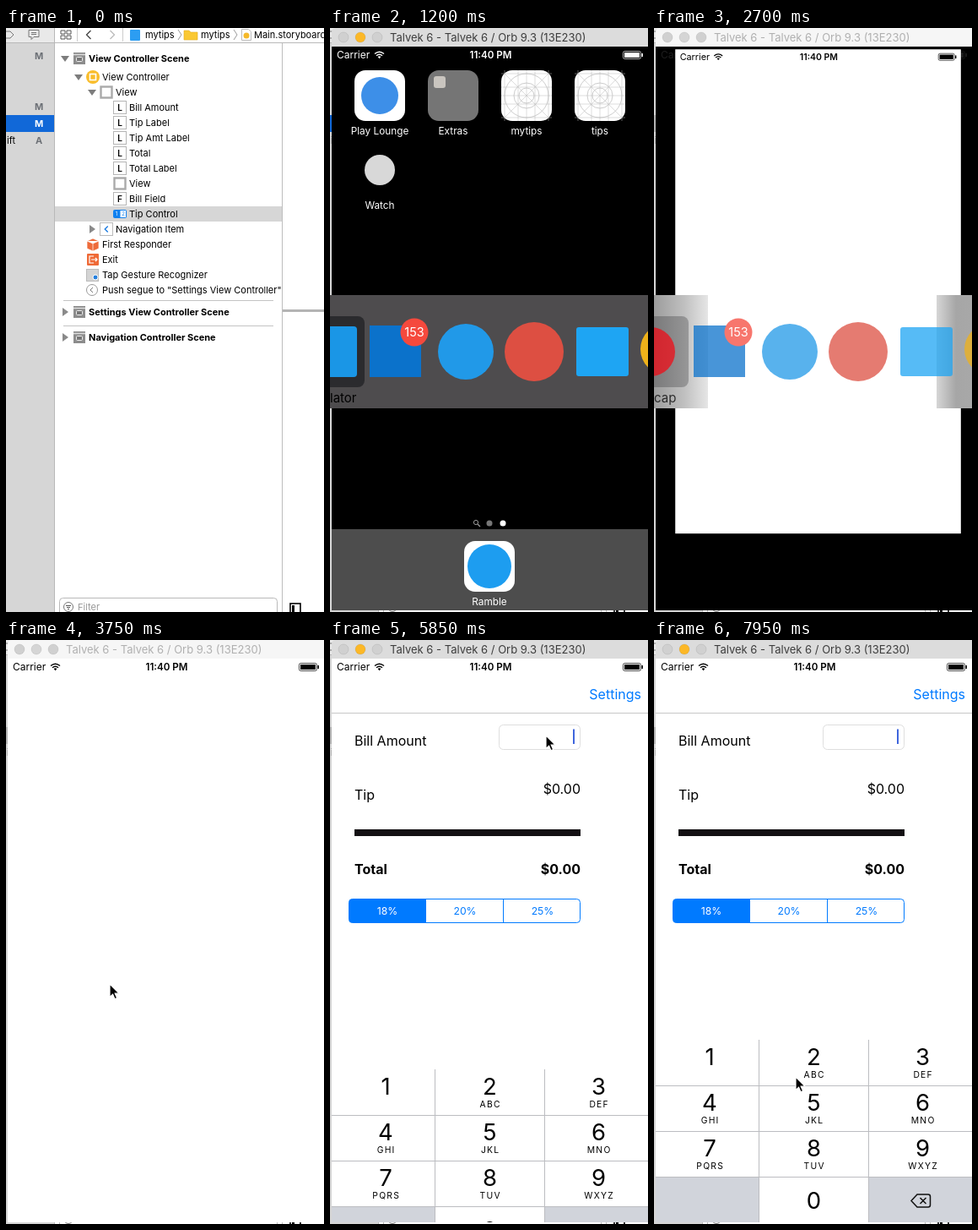
Write an HTML page that moves like this. It is 377 px wide and 691 px high and loops after 8 s.

```html
<!DOCTYPE html>
<html lang="en">
<head>
<meta charset="utf-8">
<title>Tip calculator demo</title>
<style>
html, body { margin: 0; width: 100%; height: 100%; overflow: hidden; background: #fff; }
svg { display: block; width: 377px; height: 691px; font-family: Inter, sans-serif; }
text { white-space: pre; }
</style>
</head>
<body>
<svg id="stage" viewBox="0 0 377 691"></svg>
<script>
const BLUE = '#007aff';
const stage = document.getElementById('stage');

// Markup helpers; text is placed by the vertical centre of its capitals.
const text = (x, y, s, size = 11, attrs = '') =>
  `<text x="${x}" y="${y + size * .364}" font-size="${size}" ${attrs}>${s}</text>`;
const rect = (x, y, w, h, fill, attrs = '') =>
  `<rect x="${x}" y="${y}" width="${w}" height="${h}" fill="${fill}" ${attrs}/>`;
const circle = (x, y, r, fill, attrs = '') =>
  `<circle cx="${x}" cy="${y}" r="${r}" fill="${fill}" ${attrs}/>`;
const path = (d, stroke, width = 1, fill = 'none', attrs = '') =>
  `<path d="${d}" stroke="${stroke}" stroke-width="${width}" fill="${fill}" ${attrs}/>`;
const group = (id, body, attrs = '') => `<g id="${id}" ${attrs}>${body}</g>`;
const middle = 'text-anchor="middle"', end = 'text-anchor="end"', bold = 'font-weight="700"';

// ---- Editor window ----
const arrow = (x, y, open) => open
  ? path(`M${x - 5} ${y - 3}h10l-5 7z`, 'none', 0, '#7d7d7d')
  : path(`M${x - 3} ${y - 5}v10l7 -5z`, 'none', 0, '#8a8a8a');
const chevron = (x, y, h, dir, color, width) =>
  path(`M${x - dir * h / 2} ${y - h}l${dir * h} ${h}l${-dir * h} ${h}`, color, width);
const folder = x => path(`M${x} 3h6l2 2h8v9h-16z`, '#e3ae1c', .6, '#fac832');
const sceneIcon = y => rect(80, y - 7, 14, 14, '#8c8c8c') +
  path(`M80 ${y - 4.5}h14`, '#ddd', 1.5) + rect(83.5, y - 1.5, 7, 5, '#777', 'stroke="#eee" rx="1"');
const viewIcon = (x, y) => rect(x + 1, y - 6.5, 13, 13, '#fff', 'stroke="#aaa" stroke-width="2.4"');
const letterIcon = (y, s) => rect(127.5, y - 7.5, 15, 15, '#fff', 'stroke="#b5b5b5"') +
  text(135, y, s, 10, middle + ' font-weight="600"');

function editor() {
  const outline = ['Bill Amount', 'Tip Label', 'Tip Amt Label', 'Total', 'Total Label', 'View', 'Bill Field', 'Tip Control'];
  const kinds = 'LLLLLVFC';
  let s = rect(0, 0, 377, 691, '#fff') + rect(0, 0, 57, 691, '#d6d6d6') + rect(0, 0, 57, 17, '#e9e9e9') +
    path('M0 17.5H377M57.5 0V691', '#b8b8b8') + path('M327.5 18V691', '#bdbdbd') +
    path('M-4 4h9l4 4l-4 4h-9', '#777') + path('M27 2.5h12v8h-6l-3 3v-3h-3zM30 5.5h6M30 7.5h6', '#777') +
    rect(0, 103, 57, 20, '#1168d8', 'id="row"');
  [33, 93, 113, 133].forEach((y, i) => s += text(39, y, i == 3 ? 'A' : 'M', 11,
    `${middle} ${bold} fill="${i == 2 ? '#fff' : '#6c7076'}"`));
  s += text(11, 133, 'ift', 11, end) +
    path('M65 3h5v4h-5zM72 3h5v4h-5zM65 9h5v4h-5zM72 9h5v4h-5z', '#555') + path('M84.5 0V16M138.5 0V16', '#ccc') +
    chevron(98, 8, 5, -1, '#444', 1.3) + chevron(126, 8, 5, 1, '#bbb', 1.3) +
    rect(147, 2, 12, 13, '#2c9df2', 'rx="1"') + text(165, 8, 'mytips') + path('M204 2l4 6l-4 6M270 2l4 6l-4 6', '#999') +
    folder(211) + text(231, 8, 'mytips') +
    path('M279.5 1.5h8l3 3v10h-11z', '#bbb', 1, '#fff') + circle(285, 9, 3.5, '#f5b92b') + text(294, 8, 'Main.storyboard');

  s += rect(58, 211, 269, 18, '#d6d6d6') + arrow(70, 36, 1) + sceneIcon(36) +
    text(98, 36, 'View Controller Scene', 11, bold) +
    arrow(86, 58, 1) + circle(103, 58, 8, '#f9bd2b') + rect(99.5, 54.5, 7, 7, '#f9bd2b', 'stroke="#fff" stroke-width="1.6"') +
    text(114, 58, 'View Controller') + arrow(102, 76, 1) + viewIcon(111.5, 76) + text(130, 76, 'View');
  outline.forEach((name, i) => {
    const y = 94 + 18 * i, kind = kinds[i];
    s += text(146, y, name) + (kind == 'V' ? viewIcon(127.5, y) : kind != 'C' ? letterIcon(y, kind) :
      rect(127, y - 5, 16, 10, '#1181ef', 'rx="2"') + rect(135.5, y - 4, 6.5, 8, '#fff') +
      text(131, y, 1, 6, middle + ' fill="#fff"') + text(139, y, 2, 6, middle + ' fill="#1181ef"'));
  });
  s += arrow(102, 238) + rect(111.5, 230.5, 15, 15, '#fff', 'stroke="#bbb"') + chevron(119, 238, 3.5, -1, '#1c7be0', 1.4) +
    text(130, 238, 'Navigation Item') +
    path('M96 252l7-3l7 3v9l-7 3l-7-3zM96 252l7 3l7-3M103 255v9', '#fff', .7, '#ee6b3a') + text(114, 256, 'First Responder') +
    rect(96, 267, 14, 14, '#ef6a37', 'rx="1"') + path('M104 270h-5v8h5M101 274h7M106 272l2 2l-2 2', '#fff', 1.2) + text(114, 274, 'Exit') +
    rect(95.5, 285.5, 14, 14, '#d4d4d4', 'stroke="#bbb"') + circle(106, 295, 3, '#2680dd', 'stroke="#fff"') + text(114, 292, 'Tap Gesture Recognizer') +
    circle(102, 310, 6.5, '#fff', 'stroke="#999"') + chevron(101.5, 310, 3, -1, '#777', 1) +
    text(114, 310, 'Push segue to "Settings View Controller"') +
    path('M68 322.5H317M68 352.5H317', '#c4c4c4');
  ['Settings', 'Navigation'].forEach((name, i) => {
    const y = 336 + 30 * i;
    s += arrow(70, y) + sceneIcon(y) + text(98, y, name + (i ? '' : ' View') + ' Controller Scene', 11, bold);
  });
  return s + rect(63.5, 674.5, 258, 22, '#fff', 'rx="4" stroke="#b9b9b9"') + circle(74, 685, 5.5, '#fff', 'stroke="#777"') +
    path('M71 683.5h6M72 685.5h4M73 687.5h2', '#555') + text(85, 685, 'Filter', 11, 'fill="#999"') +
    rect(328, 333, 49, 3, '#b4b4b4') + rect(337, 681, 12, 14, '#fff', 'stroke="#000" stroke-width="1.6"') + rect(339, 683, 3, 8, '#000');
}

// ---- Phone simulator ----
const status = color => `<g fill="${color}">` + text(8, 32, 'Carrier', 12) +
  text(190.5, 32, '11:40 PM', 11.6, middle + ' font-weight="600"') +
  path('M53 30.5q5.5-4.6 11 0M55 32.8q3.5-3 7 0', color, 1.5) + path('M56.6 34l1.9 2.2l1.9-2.2q-1.9-1.4-3.8 0z', 'none', 0, color) +
  rect(347.5, 27.5, 21, 9, 'none', `rx="2" stroke="${color}" stroke-width=".7"`) + rect(349, 29, 18, 6, color) + rect(369.5, 30, 1.5, 4, color) + '</g>';
const tile = (x, y, fill, label) => rect(x, y, 60, 60, fill, 'rx="13"') +
  text(x + 30, y + 72, label, 11.8, middle + ' fill="#fff"');
const gridTile = (x, label) => {
  let s = tile(x, 50, '#fff', label) + `<g transform="translate(${x} 50)">`;
  for (const r of [9, 15, 26]) s += circle(30, 30, r, 'none', 'stroke="#aaa" stroke-width=".6"');
  return s + path('M0 30H60M30 0V60M0 20H60M0 40H60M20 0V60M40 0V60M0 4H60M0 56H60M4 0V60M56 0V60M4 4L56 56M56 4L4 56', '#bbb', .5) + '</g>';
};
const home = () => status('#fff') + tile(29, 50, '#fff', 'Play Lounge') + circle(59, 80, 22, '#3d8fe8') +
  tile(116, 50, '#757575', 'Extras') + rect(123, 57, 14, 14, '#c9c5bf', 'rx="3"') +
  gridTile(203, 'mytips') + gridTile(290, 'tips') + circle(59, 168, 18, '#d8d8d8') +
  text(59, 210, 'Watch', 11.8, middle + ' fill="#fff"') +
  circle(173, 585, 2.6, 'none', 'stroke="#999"') + path('M175 587l3 3', '#999', 1.2) + circle(189, 586, 3.5, '#777') + circle(205, 586, 3.5, '#fff') +
  group('dock', rect(2, 593, 375, 96, '#4d4d4d') + tile(159, 607, '#fff', 'Ramble') + circle(189, 637, 26, '#1d9df0'));

const form = () => path('M2 86.5H377', '#c8c8c8') +
  text(369, 64, 'Settings', 16, `${end} fill="${BLUE}"`) + text(29, 119.5, 'Bill Amount', 16) +
  rect(200.5, 100.5, 96, 29, '#fff', 'rx="5" stroke="#dedede"') + text(29, 183, 'Tip', 16) +
  text(297, 176, '$0.00', 16, end) + rect(29, 224, 268, 8, '#131013') +
  text(29, 271, 'Total', 16, bold) + text(297, 271, '$0.00', 16, `${end} ${bold}`) +
  rect(22.5, 306.5, 274, 28, '#fff', `rx="4" stroke="${BLUE}"`) + path('M114 306.5H26.5a4 4 0 0 0 -4 4v20a4 4 0 0 0 4 4H114z', 'none', 0, BLUE) +
  path('M205.5 306V335', BLUE) +
  ['18%', '20%', '25%'].map((s, i) => text(68 + 92 * i, 321, s, 12.2, `${middle} fill="${i ? BLUE : '#fff'}"`)).join('');

function keyboard() {
  const letters = ['', 'ABC', 'DEF', 'GHI', 'JKL', 'MNO', 'PQRS', 'TUV', 'WXYZ'], columns = [66, 189.5, 318.5];
  let s = rect(2, 0, 375, 216, '#fff') + rect(2, 162, 122, 54, '#d1d4db') + rect(255, 162, 122, 54, '#d1d4db');
  letters.forEach((name, i) => {
    const x = columns[i % 3], y = 54 * Math.floor(i / 3);
    s += text(x, y + 20, i + 1, 27.5, middle) + text(x + .7, y + 41.5, name, 10.3, middle + ' letter-spacing="1.3"');
  });
  return s + text(189.5, 189.5, 0, 27.5, middle) + path('M2 54.5H377M2 108.5H377M2 162.5H377M124.5 0V216M254.5 0V216', '#bcbdc1') +
    path('M305 190.5l7-7.5h13q2.5 0 2.5 2.5v10q0 2.5-2.5 2.5h-13zM315.5 187l7 7M322.5 187l-7 7', '#111', 1.5);
}

// ---- App switcher ----
const switcherIcons = () =>
  group('pick', rect(-45, 341, 86, 84, '#2b2b2e', 'rx="8" id="pickBox"') + text(0, 438, '', 15, 'id="pickLabel"')) +
  rect(-28, 353, 60, 60, '#1a96e6', 'rx="4" id="simIcon"') + circle(-4, 383, 29, '#e3000b', 'id="capIcon"') +
  rect(47, 352, 61, 61, '#0b72cb') + circle(100, 360, 16.5, '#f5493d') + text(100, 360, '153', 14.5, middle + ' fill="#fff"') +
  circle(161, 383, 33, '#2199e8') + circle(242, 383, 35, '#dd4f42') + rect(292, 354, 62, 58, '#1ea5f3', 'rx="3"') + circle(398, 380, 30, '#efb21a');
const gradient = (id, stops) => `<linearGradient id="${id}" gradientUnits="userSpaceOnUse" x1="0" x2="377">` +
  stops.map(([x, color, alpha = 1]) => `<stop offset="${x / 377}" stop-color="${color}" stop-opacity="${alpha}"/>`).join('') + '</linearGradient>';
const band = (id, fill) => rect(0, 316, 377, 134, fill, `id="${id}"`);

stage.innerHTML = `<defs><clipPath id="screen">${rect(2, 22, 375, 667, '#000')}</clipPath>` +
  gradient('dark', [[0, '#8c8b8c'], [20, '#767476'], [54, '#585558'], [305, '#585558'], [348, '#7b797b'], [377, '#a2a2a2']]) +
  gradient('edges', [[0, '#9c9c9c'], [36, '#c0c0c0'], [64, '#e6e6e6'], [64, '#fff', 0], [335, '#fff', 0], [335, '#d6d6d6'], [358, '#a6a6a6'], [377, '#a8a8a8']]) +
  '</defs>' + editor() +
  group('phone',
    path('M2 22V5q0-5 5-5H377V22z', 'none', 0, '#dcdcdc', 'id="titleBar"') +
    [16, 36, 56].map((x, i) => circle(x, 11, 6, '#d0d0d0', `id="light${i}" stroke="#000" stroke-opacity=".08"`)).join('') +
    text(71, 11.5, 'Talvek 6 - Talvek 6 / Orb 9.3 (13E230)', 13, 'id="title"') + rect(2, 22, 375, 667, '#000') +
    `<g clip-path="url(#screen)">` + group('home', home()) +
    group('app', rect(0, 0, 0, 0, '#fff', 'id="sheet"') + group('appStatus', status('#000')) + group('form', form()) +
      rect(288, 105.5, 2, 17.5, '#3f66dd', 'id="caret"') + group('keys', keyboard())) + '</g>') +
  band('lightBand', 'rgba(208,208,208,.94)') + band('flatBand', '#4e4c4e') + band('edgeBand', 'url(#edges)') + band('darkBand', 'url(#dark)') +
  group('icons', switcherIcons()) +
  group('cursor', path('M0 0V15.5L3.6 12.2L6 17.8L8.6 16.6L6.2 11.2H11Z', '#fff', 1.2, '#000'));

const el = id => document.getElementById(id);
const show = (id, alpha) => el(id).setAttribute('opacity', Math.max(0, Math.min(1, +alpha)));
const fill = (id, color) => el(id).setAttribute('fill', color);
const move = (id, x, y, more = '') => el(id).setAttribute('transform', `translate(${x} ${y}) ${more}`);
const smooth = u => (u = Math.max(0, Math.min(1, u)), u * u * (3 - 2 * u));
const mix = (a, b, u) => a + (b - a) * u;

// Critically damped spring from 0 to 1.
const spring = (time, rate) => {
  const u = Math.max(0, time * rate);
  return Math.min(1, 1.005 * (1 - (1 + u) * Math.exp(-u)));
};

const trail = [[4500, 123, 407], [5400, 256, 113], [6600, 256, 113], [7350, 125, 527], [7650, 111, 524], [7950, 168, 517], [8000, 168, 517]];
function pointer(t) {
  const i = Math.max(1, trail.findIndex(p => p[0] > t)), [a, b] = [trail[i - 1], trail[i]];
  const u = smooth((t - a[0]) / (b[0] - a[0]));
  return [mix(a[1], b[1], u), mix(a[2], b[2], u)];
}

function drawPhone(t, launch) {
  const active = t < 2550 || t >= 5250;
  show('phone', t >= 1200);
  fill('row', t < 1350 ? '#1168d8' : '#b4b4b4');
  fill('titleBar', active ? '#dcdcdc' : '#f6f6f6');
  fill('title', active ? '#3d3d3d' : '#b0b0b0');
  fill('light1', active ? '#fcb827' : '#d5d5d5');

  // The sheet grows out of its home-screen tile while the dock slides away.
  const x = mix(203, 2, launch), y = mix(50, 22, launch), width = mix(60, 375, launch);
  const sheet = { x, y, width, height: mix(110, 689, launch ** 1.39) - y };
  for (const k in sheet) el('sheet').setAttribute(k, sheet[k]);
  move('appStatus', x, y, `scale(${width / 375}) translate(-2 -22)`);
  move('dock', 0, 96 * Math.min(1, launch * 1.2));
  show('home', 1 - launch);
  show('app', launch * 3);

  show('form', t < 4200 ? 0 : (t - 4050) / 300);
  show('caret', t >= 5700 && (t - 4800) % 1000 < 600);
  move('keys', 0, 473 + (t < 5700 ? 216 : Math.round(216 * Math.exp((5620 - t) / 126))));
}

// Both uses of the switcher: open, pick an app, then fade out.
function drawSwitcher(t, launch) {
  const first = t < 1950, opened = first ? 450 : 1950, picked = first ? 1050 : 2400;
  const age = t - picked, alpha = t < opened ? 0 : age < 300 ? 1 : Math.max(0, (450 - age) / 200);
  show('icons', alpha);
  show('lightBand', first && age < 150 && alpha);
  show('flatBand', first && age >= 150 && alpha);
  show('edgeBand', !first && age >= 150 && alpha * 1.34);
  show('darkBand', !first && alpha * (1 - launch * 1.15));
  show('pick', age >= 0);
  show('pickBox', first ? 1 : .4);
  el('pickLabel').textContent = first ? 'lator' : 'cap';
  show('simIcon', first);
  show('capIcon', !first);
}

function draw(t) {
  const launch = spring(t - 2450, .01464);
  drawPhone(t, launch);
  drawSwitcher(t, launch);
  show('cursor', t >= 3750);
  move('cursor', ...pointer(Math.max(t, 4500)));
}

function tick() {
  draw(Math.floor(performance.now() % 8000 / 150) * 150);
  requestAnimationFrame(tick);
}
tick();
</script>
</body>
</html>
```
